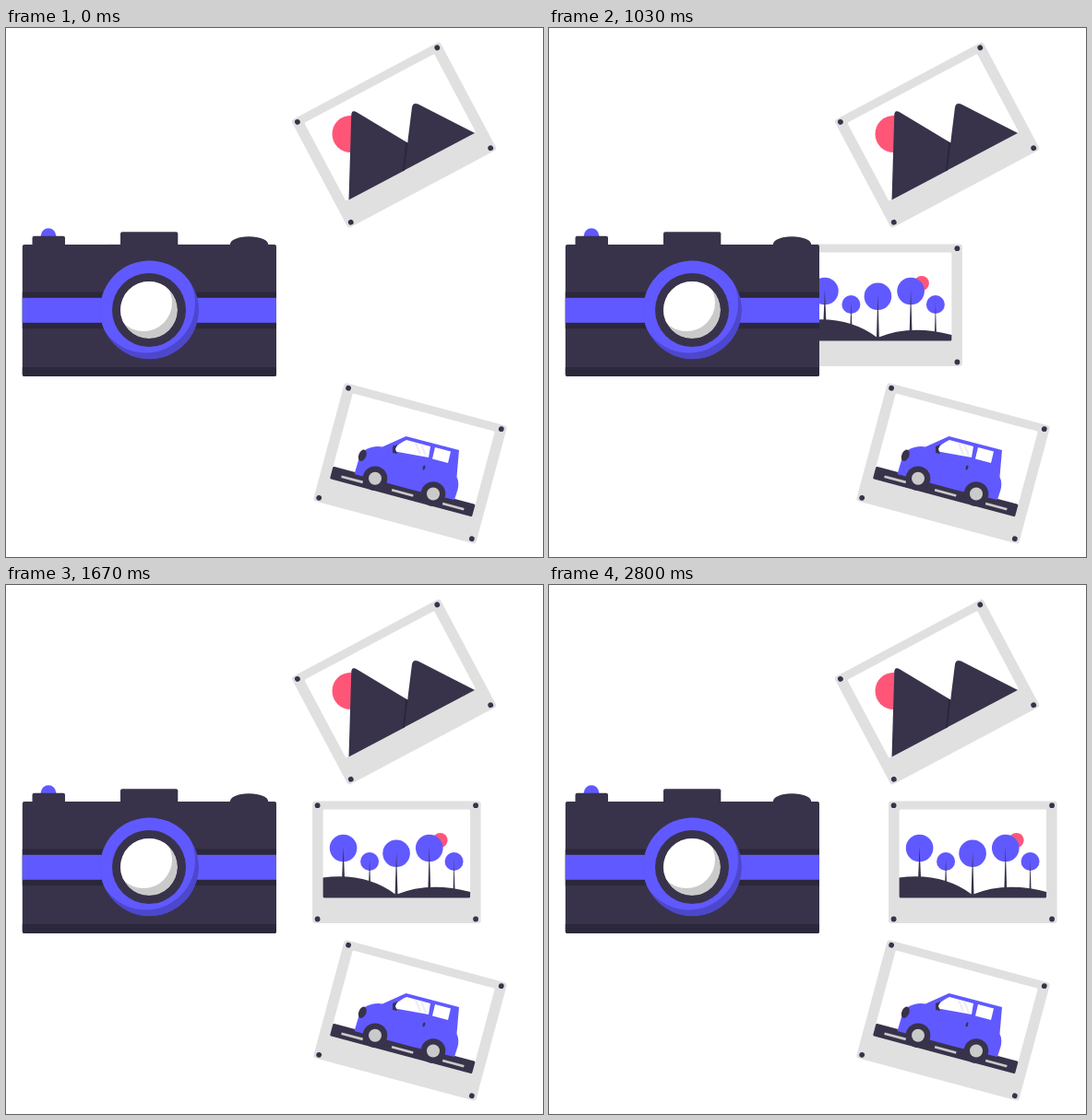
Animation of 582 by 574 pixels, one loop 2830 ms. Source, as an HTML page:

```html
<!DOCTYPE html>
<html>
<head>
<meta charset="utf-8">
<style>
html, body { margin: 0; height: 100%; overflow: hidden; background: #fff; }
svg { display: block; width: 582px; height: 574px; }
.dark { fill: #38334a; }
.deep { fill: #2c283b; }
.blue { fill: #6059ff; }
.grey { fill: #cacaca; }
.white { fill: #fff; }
.red { fill: #ff5678; }
</style>
</head>
<body>
<svg viewBox="0 0 582 574">
  <defs>
    <clipPath id="ring"><circle cx="155.5" cy="306" r="53.5"/></clipPath>
    <clipPath id="glass"><circle cx="155" cy="306" r="31"/></clipPath>
    <g id="frame">
      <rect width="182.5" height="132.5" rx="3" fill="#e0e0e0"/>
      <rect class="white" x="11.5" y="9" width="159.5" height="96" rx="1.5"/>
      <g class="dark">
        <circle cx="5.5" cy="4.7" r="2.9"/><circle cx="177" cy="4.7" r="2.9"/>
        <circle cx="5.5" cy="128" r="2.9"/><circle cx="177" cy="128" r="2.9"/>
      </g>
    </g>
  </defs>

  <!-- mountains -->
  <use href="#frame" transform="translate(420.5 116) rotate(-28) translate(-91.25 -66.25)"/>
  <circle class="red" cx="373.5" cy="115" r="20"/>
  <path class="dark" d="M371.5 186.5L374.3 93.5Q375 88.500 379.500 91L436 125L432 154.500Z"/>
  <path class="dark" d="M431.500 154.500L440 86Q441 80.500 446.500 82.500L508 114Z"/>
  <path class="deep" d="M433 123.500L435.500 125L432 154.300L430 155.300Z"/>

  <!-- car -->
  <g transform="translate(438 472.400) rotate(15) translate(-91.25 -66.25)">
    <use href="#frame"/>
    <rect class="dark" x="11.500" y="91" width="159.500" height="14" rx="1.500"/>
    <path d="M23 99.300h24M79.500 99.300h24M136.500 99.300h24" stroke="#cacaca" stroke-width="2.600"/>
  </g>
  <path class="blue" d="M377.500 484L382 469Q385 457 396 455Q402 453.500 408 454.500L433.500 443L491 458L488.500 487Q491.500 493 489.500 501L486 512L440 501Z"/>
  <path class="white" d="M419 459Q426 450 434 447L460 454L458 466Z"/>
  <path class="white" d="M465 455L482 459.500L479 472L462 467.500Z"/>
  <path d="M444 450.500L449 462.500M450 452L455 464" stroke="#ededf2" stroke-width="2"/>
  <path class="dark" d="M419 454L424 452L422 457L424 462L419 461Z"/>
  <ellipse class="dark" cx="386.300" cy="463.800" rx="4" ry="6.500" transform="rotate(22 386.300 463.800)"/>
  <ellipse class="dark" cx="453" cy="477" rx="1.300" ry="2.500" transform="rotate(15 453 477)"/>
  <circle class="dark" cx="400" cy="488.700" r="13.300"/><circle class="grey" cx="400" cy="488.700" r="7"/>
  <circle class="dark" cx="463" cy="505.500" r="13.300"/><circle class="grey" cx="463" cy="505.500" r="7"/>

  <!-- trees, sliding out of the camera -->
  <g id="slide">
    <use href="#frame"/>
    <circle class="red" cx="138.500" cy="42.500" r="8"/>
    <g id="trees"></g>
    <path class="dark" d="M11.500 83Q58 77 90.500 101.500Q126 86.500 171 98.500V103.500Q171 105 169.500 105H13Q11.500 105 11.500 103.500Z"/>
  </g>

  <!-- camera -->
  <circle class="blue" cx="46" cy="225.500" r="8.300"/>
  <g class="dark">
    <rect x="28.500" y="225.700" width="35.500" height="12" rx="2"/>
    <rect x="124" y="221.300" width="62.300" height="16" rx="2"/>
    <ellipse cx="263.500" cy="235" rx="20.700" ry="8.700"/>
    <rect x="17.800" y="235" width="275.200" height="143" rx="2"/>
  </g>
  <path class="deep" d="M17.800 286.500h275.200v39.800h-275.200zM17.800 368h275.200v8q0 2-2 2h-271.200q-2 0-2-2z"/>
  <rect class="blue" x="17.800" y="292.800" width="275.200" height="27"/>
  <g clip-path="url(#ring)">
    <circle cx="155.500" cy="306" r="53.500" fill="#4d47cc"/>
    <circle class="blue" cx="151.500" cy="299" r="53.500"/>
  </g>
  <circle class="dark" cx="155" cy="306" r="40"/>
  <g clip-path="url(#glass)">
    <circle class="grey" cx="155" cy="306" r="31"/>
    <circle class="white" cx="149" cy="298" r="31"/>
  </g>
</svg>
<script>
const LOOP = 2830, GLIDE = 2960, END = 368.5, TRAVEL = 259;
const slide = document.getElementById('slide');

// x, y, radius, trunk foot
document.getElementById('trees').innerHTML = [
  [33.5, 51, 14.8, 84], [62, 65.5, 10, 90], [91, 56.7, 14.8, 102],
  [126.700, 51, 14.8, 98], [153.500, 65.5, 10, 98]
].map(([x, y, r, foot]) => {
  const w = r / 10;
  return `<circle class="blue" cx="${x}" cy="${y}" r="${r}"/>
    <path class="dark" d="M${x} ${y - 2}L${x + w} ${foot}H${x - w}Z"/>`;
}).join('');

// cubic-bezier(.25, .1, .25, 1)
function ease(x) {
  let lo = 0, hi = 1, s;
  for (let i = 0; i < 24; i++) {
    s = (lo + hi) / 2;
    if (.75 * s * (1 - s) + s ** 3 < x) lo = s; else hi = s;
  }
  return .3 * s * (1 - s) ** 2 + 3 * s * s * (1 - s) + s ** 3;
}

function draw() {
  const t = performance.now() % LOOP;
  const x = END - TRAVEL * (1 - ease(t / GLIDE));
  slide.setAttribute('transform', `translate(${x} 234.5)`);
  requestAnimationFrame(draw);
}
draw();
</script>
</body>
</html>
```
